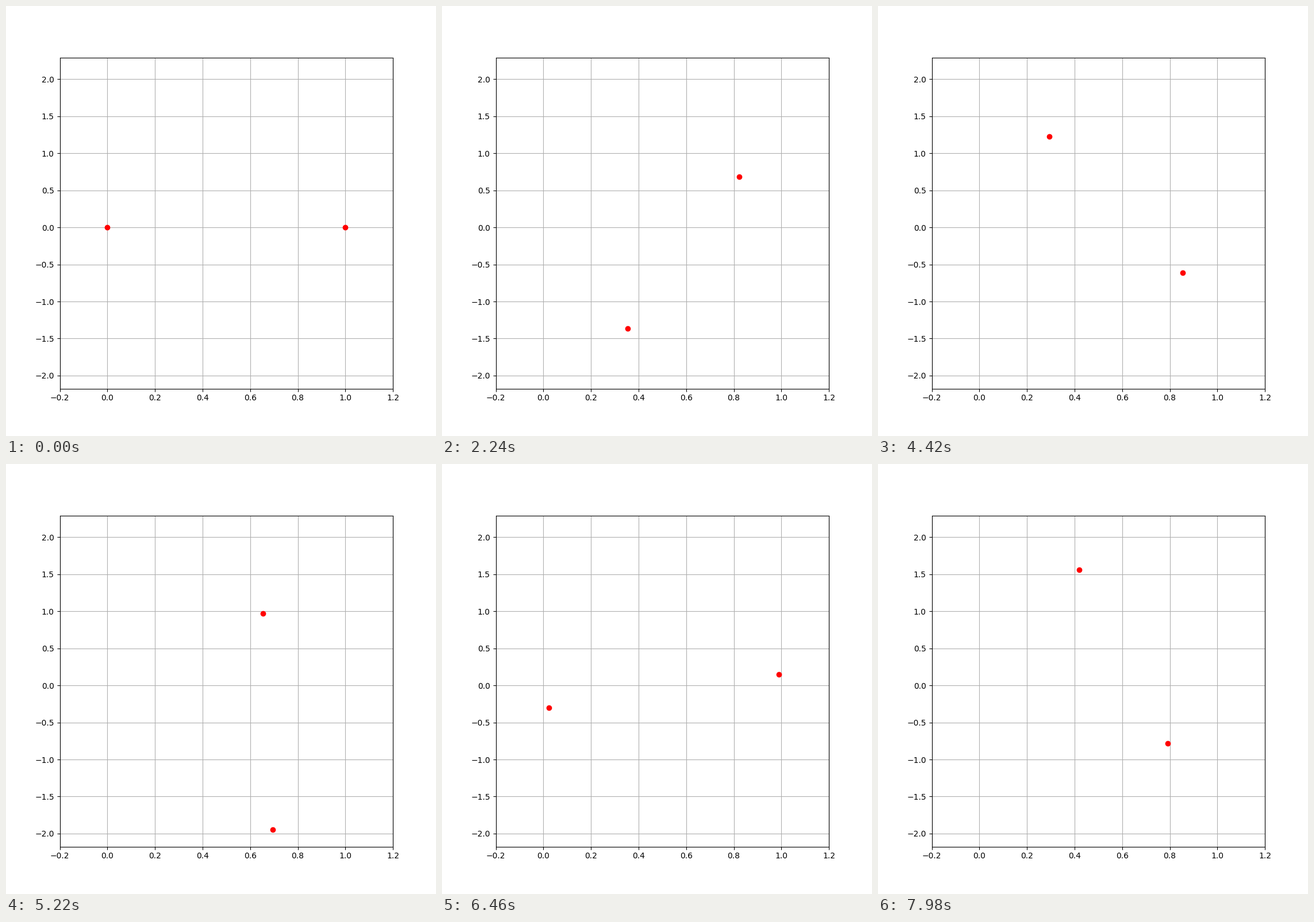
These frames come from a looping animation (748x748 px, 8 s). A matplotlib script:

```python
import numpy as np
import matplotlib.pyplot as plt
from matplotlib.animation import FuncAnimation

SIZE, DPI = 748, 100
FRAMES, INTERVAL = 400, 20
DT = 0.01
G, M1, M2 = 1.0, 1.0, 2.0


def accel(r):
    return -G * (M1 + M2) * r / np.hypot(*r) ** 3


def simulate(steps):
    """Velocity Verlet for the relative orbit; returns x and vx."""
    r = np.array([1.0, 0.0])
    v = np.array([0.0, 1.0])
    a = accel(r)
    x, vx = np.empty(steps), np.empty(steps)
    for i in range(steps):
        x[i], vx[i] = r[0], v[0]
        half = v + a * DT / 2
        r = r + half * DT
        a = accel(r)
        v = half + a * DT / 2
    return x, vx


rel_x, rel_v = simulate(FRAMES)
center = M2 / (M1 + M2)
shares = np.array([-M2, M1]) / (M1 + M2)

fig, ax = plt.subplots(figsize=(SIZE / DPI, SIZE / DPI), dpi=DPI)
ax.set_xlim(-0.2, 1.2)
ax.set_ylim(-2.177, 2.2913)
ax.grid(True)
dots, = ax.plot([], [], "ro")


def update(i):
    # Phase-space position of each body: x against vx
    dots.set_data(center + shares * rel_x[i], shares * rel_v[i])
    return dots,


anim = FuncAnimation(fig, update, frames=FRAMES, interval=INTERVAL,
                     init_func=lambda: update(0), repeat=True, repeat_delay=0)
plt.show()
```
